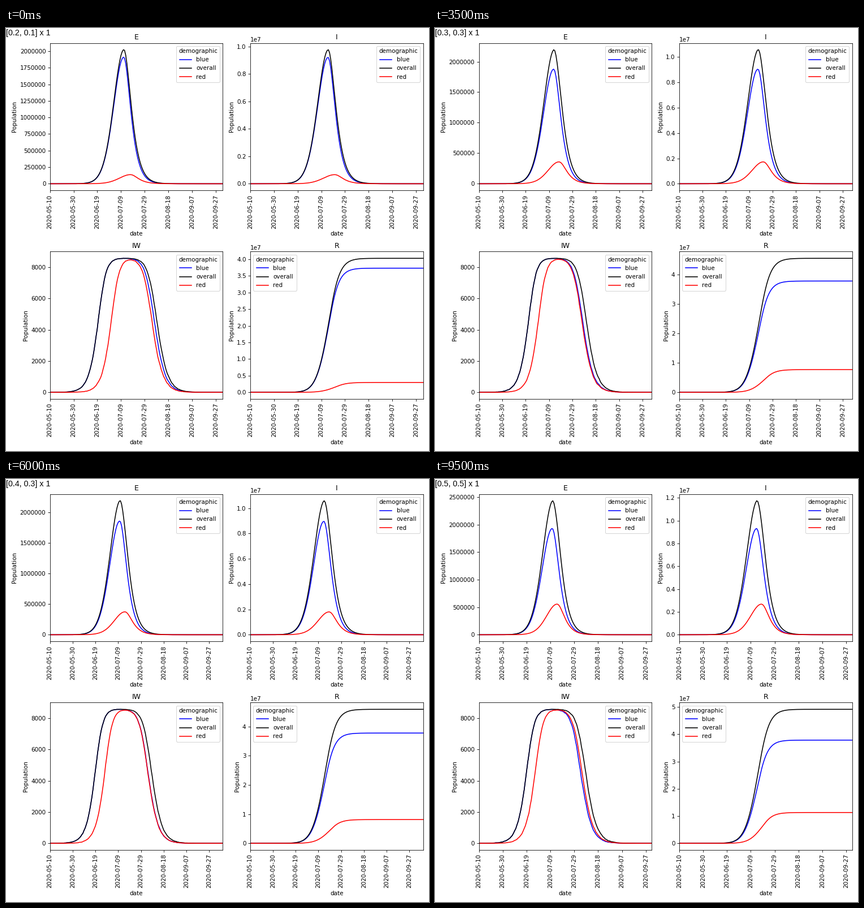
Recreate the animation shown at these times as a matplotlib script. Size 748 px wide and 748 px high, loop 10 s.

```python
import numpy as np
import matplotlib.pyplot as plt
from matplotlib.animation import FuncAnimation
from matplotlib.ticker import MaxNLocator

SIZE = 748
INCHES = 10
RUNS = 20
WARDS = 8588
START = np.datetime64("2020-05-10")
COLORS = {"blue": "blue", "overall": "black", "red": "red"}

# Key runs between which the outbreak's length and peak day drift
KEY_RUNS = (0, 3, 7, 10, 14, 16, 19)
KEY_LENGTHS = (146, 149, 148, 152, 151, 154, 145)
KEY_PEAKS = (62.3, 62.5, 64.0, 62.7, 60.1, 65.1, 61.5)

plt.rcParams["font.family"] = "DejaVu Sans"
fig, axes = plt.subplots(2, 2, figsize=(INCHES, INCHES), dpi=SIZE / INCHES)
caption = fig.text(0, 1 - 13 / SIZE, "", family="Liberation Sans",
                   size=14.3 * 72 / fig.dpi)


def wave(days, peak, width):
    """Epidemic curve of height 1: rounded rise, quicker fall with a long tail."""
    u = (days - peak) / width
    k = np.where(u < 0, 0.35, 0.225)
    c = np.where(u < 0, 23.3, 5.7)
    return np.exp(-k * (np.hypot(u, c) - c))


def total(days, peak, width):
    """Running total of a wave, from 0 to 1."""
    c = np.cumsum(wave(days, peak, width))
    return c / c[-1]


def gate(u, tail, extra):
    """S-curve whose upper end closes faster than its lower end."""
    z = tail * u + extra * 3 * (np.logaddexp(0, u / 3) - np.log(2))
    return 1 / (1 + np.exp(-z))


def wards(days, rise, fall, jitter):
    p = gate(days - rise, 0.22, 0.1) * gate(fall - days, 0.2, 0.07)
    return WARDS * np.clip(p + jitter * np.sqrt(p * (1 - p)), 0, 1)


def with_overall(blue, red):
    return {"blue": blue, "overall": blue + red, "red": red}


def simulate(index):
    a, b = 0.2 + 0.1 * (index // 5), 0.1 + 0.1 * (index % 5)
    last = int(round(np.interp(index, KEY_RUNS, KEY_LENGTHS)))
    peak = np.interp(index, KEY_RUNS, KEY_PEAKS)
    days = np.arange(last + 1)

    # Sizes of the outbreak in each group; a wider wave means a lower peak
    blue_e = 1e6 * (1.91 - 0.4 * (a - 0.2) + 3.9 * (a - 0.2) ** 2 * (b - 0.1))
    blue_r = 1e7 * (3.795 - 0.1 * np.exp(-5 * b))
    red_r = 1.5e7 * (1 - np.exp(-(1.8 + 2 * a) * b))
    blue_w = blue_r / blue_e / 18.9
    red_w = blue_w * (1.12 - 0.17 * b)
    red_e = red_r / red_w / 18.9

    delay = np.exp(-4 * b)
    red_peak = peak + 3.7 + 3 * delay
    rise = peak - 22
    red_rise = rise + 6.3 + 7 * delay
    jitter = np.random.default_rng(index).normal(0, 0.006, (2, last + 1))

    panels = {
        "E": with_overall(blue_e * wave(days, peak, blue_w),
                          red_e * wave(days, red_peak, red_w)),
        "I": with_overall(4.82 * blue_e * wave(days, peak + 3.4, blue_w * 1.03),
                          4.82 * red_e * wave(days, red_peak + 3.4, red_w * 1.03)),
        "IW": {
            "blue": wards(days, rise, peak + 26.9 - 5.2 * b, jitter[0]),
            "overall": wards(days, rise, peak + 28.5, jitter[0]),
            "red": wards(days, red_rise, peak + 23.5 + 5 * a - b, jitter[1]),
        },
        "R": with_overall(blue_r * total(days, peak + 5.2, blue_w),
                          red_r * total(days, red_peak + 5.2, red_w)),
    }
    return a, b, days, panels


def draw_panel(ax, title, days, curves):
    ax.clear()
    for name, values in curves.items():
        ax.plot(days, values, color=COLORS[name], lw=1.5, label=name)
    top = max(values.max() for values in curves.values())
    low, high = -0.05 * top, 1.05 * top
    ticks = MaxNLocator(9, steps=[1, 2, 2.5, 5, 10]).tick_values(low, high)
    ax.ticklabel_format(axis="y", style="sci", scilimits=(-7, 7))
    ax.set_yticks([t for t in ticks if low <= t <= high])
    ax.set_ylim(low, high)
    marks = np.arange(0, days[-1] + 1, 20)
    ax.set_xticks(marks, [str(START + int(m)) for m in marks], rotation=90)
    ax.set_xlim(0, days[-1])
    ax.set_title(title)
    ax.set_xlabel("date")
    ax.set_ylabel("Population")
    ax.legend(title="demographic", loc="upper left" if title == "R" else "upper right")


def update(index):
    a, b, days, panels = simulate(index)
    caption.set_text(f"[{a:.1f}, {b:.1f}] x 1")
    for ax, (title, curves) in zip(axes.flat, panels.items()):
        draw_panel(ax, title, days, curves)
    fig.subplots_adjust(left=0.105, right=0.986, top=0.966, bottom=0.124,
                        wspace=0.16, hspace=0.41)
    fig.tight_layout(pad=1)
    return []


anim = FuncAnimation(fig, update, frames=RUNS, interval=500, repeat=True, repeat_delay=0)
plt.show()
```
